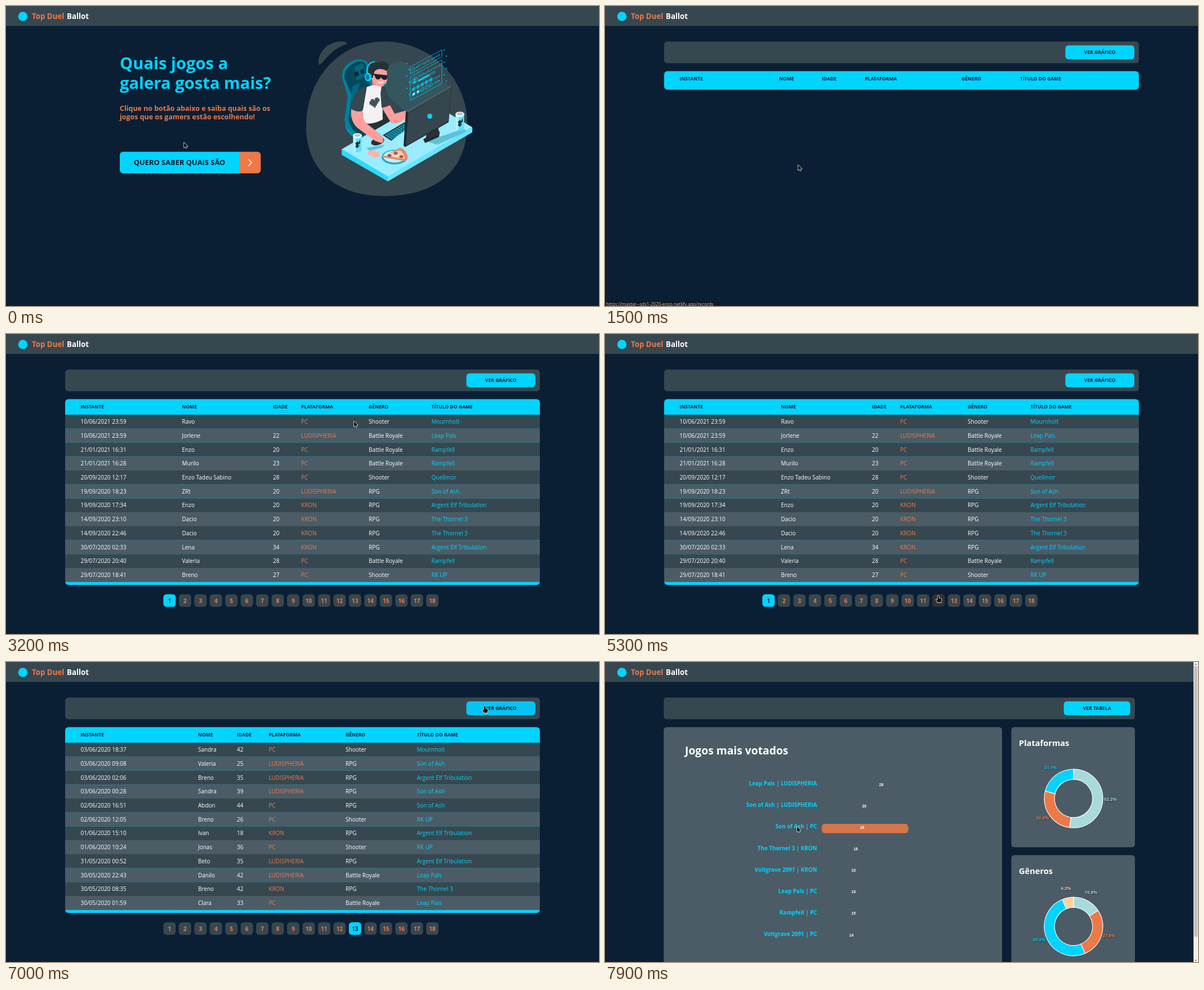
An HTML page with a canvas that plays this animation: 1053x532 px, repeating every 8 s.

```html
<!DOCTYPE html>
<html lang="pt">
<head>
<meta charset="utf-8">
<title>Top Duel Ballot</title>
<style>
html, body { margin: 0; width: 100%; height: 100%; overflow: hidden; background: #0b1f34; }
canvas { display: block; width: 1053px; height: 532px; }
</style>
</head>
<body>
<canvas id="stage"></canvas>
<script>
const W = 1053, H = 532, LOOP = 8000;
const NIGHT = '#0b1f34', SLATE = '#37474f', STEEL = '#4b5c66', CYAN = '#00d4ff', ORANGE = '#ed7947',
      MINT = '#a8dadc', PEACH = '#ffd1a1', SKIN = '#ff9e9b', INK = '#263238';
const SANS = '"Open Sans", "Noto Sans", sans-serif';
const HELV = '"Liberation Sans", Arial, sans-serif';

const canvas = document.getElementById('stage');
const c = canvas.getContext('2d');
const dpr = window.devicePixelRatio || 1;
canvas.width = W * dpr;
canvas.height = H * dpr;

// ---------- drawing helpers ----------
function rect(x, y, w, h, color, r = 0) {
  c.fillStyle = color;
  c.beginPath();
  c.roundRect(x, y, w, h, r);
  c.fill();
}
function text(s, x, y, size, color, { bold = true, align = 'left', font = SANS } = {}) {
  c.font = `${bold ? 700 : 400} ${size}px ${font}`;
  c.textAlign = align;
  c.fillStyle = color;
  c.fillText(s, x, y);
}
function fill(color, d) {
  c.fillStyle = color;
  c.fill(new Path2D(d));
}
function line(color, width, d) {
  c.strokeStyle = color;
  c.lineWidth = width;
  c.stroke(new Path2D(d));
}
function oval(color, x, y, rx, ry = rx, turn = 0) {
  c.fillStyle = color;
  c.beginPath();
  c.ellipse(x, y, rx, ry, turn, 0, 7);
  c.fill();
}
function placed(matrix, draw) {
  c.save();
  c.transform(...matrix);
  draw();
  c.restore();
}

// ---------- data ----------
const GAMES = ['Mournholt', 'Leap Pals', 'Rampfell', 'Quellmor', 'Son of Ash',
  'Argent Elf Tribulation', 'The Thornel 3', 'RK UP', 'Voltgrave 2091'];
const GENRES = { S: 'Shooter', B: 'Battle Royale', R: 'RPG' };
const PLATFORMS = { P: 'PC', L: 'LUDISPHERIA', K: 'KRON' };
const HEADS = ['INSTANTE', 'NOME', 'IDADE', 'PLATAFORMA', 'GÊNERO', 'TÍTULO DO GAME'];

// Each row: date|name|age|platform, genre and game codes
function parse(src) {
  return src.trim().split('\n').map(row => {
    const [date, name, age, code] = row.split('|');
    return [date, name, age, PLATFORMS[code[0]], GENRES[code[1]], GAMES[code[2]]];
  });
}
const PAGE1 = parse(`
10/06/2021 23:59|Ravo||PS0
10/06/2021 23:59|Jorlene|22|LB1
21/01/2021 16:31|Enzo|20|PB2
21/01/2021 16:28|Murilo|23|PB2
20/09/2020 12:17|Enzo Tadeu Sabino|28|PS3
19/09/2020 18:23|ZRt|20|LR4
19/09/2020 17:34|Enzo|20|KR5
14/09/2020 23:10|Dacio|20|KR6
14/09/2020 22:46|Dacio|20|KR6
30/07/2020 02:33|Lena|34|KR5
29/07/2020 20:40|Valeria|28|PB2
29/07/2020 18:41|Breno|27|PS7`);
const PAGE12 = parse(`
06/06/2020 21:14|Clara|31|PB1
06/06/2020 13:40|Danilo|27|KR6
06/06/2020 05:22|Breno|38|LR4
05/06/2020 22:51|Ivan|24|PS7
05/06/2020 17:03|Sandra|40|PR4
05/06/2020 11:36|Jonas|29|KR5
05/06/2020 02:18|Valeria|33|LB1
04/06/2020 20:45|Beto|22|PS0
04/06/2020 15:09|Abdon|36|LR5
04/06/2020 09:27|Clara|19|PB2
04/06/2020 03:52|Breno|41|KR6
03/06/2020 23:16|Danilo|30|PS7`);
const PAGE13 = parse(`
03/06/2020 18:37|Sandra|42|PS0
03/06/2020 09:08|Valeria|25|LR4
03/06/2020 02:06|Breno|35|LR5
03/06/2020 00:28|Sandra|39|LR4
02/06/2020 16:51|Abdon|44|PR4
02/06/2020 12:05|Breno|26|PS7
01/06/2020 15:10|Ivan|18|KR5
01/06/2020 10:24|Jonas|36|PS7
31/05/2020 00:52|Beto|35|LR5
30/05/2020 22:43|Danilo|42|LB1
30/05/2020 08:35|Breno|42|KR6
30/05/2020 01:59|Clara|33|PB1`);
const COLS_EMPTY = [132.5, 309, 385, 461.5, 633, 737];
const COLS_FIRST = [132.5, 312.5, 474, 524, 644, 755.5];
const COLS_LATER = [132.5, 341, 410, 466.5, 603, 729.5];
const VOTES = [['1L', 28], ['4L', 20], ['4P', 19], ['6K', 16], ['8K', 15], ['1P', 15], ['2P', 15], ['8P', 14]];

// ---------- pointer ----------
const PATH = [[0, 316, 242], [100, 316, 242], [300, 366, 262], [400, 368, 272], [600, 343, 282],
  [2200, 343, 282], [2400, 314.5, 245], [2700, 314.5, 245], [3200, 618, 155], [3600, 849, 96],
  [4000, 852, 80], [4500, 852, 80], [5300, 592, 466], [5600, 592, 466], [6000, 619, 467],
  [6300, 619, 467], [7000, 850, 80], [7300, 850, 80], [7900, 341, 292]];

function pointerAt(t) {
  const i = PATH.findIndex(k => k[0] > t);
  if (i < 0) return PATH[PATH.length - 1].slice(1);
  const [t0, x0, y0] = PATH[i - 1], [t1, x1, y1] = PATH[i];
  const k = (t - t0) / (t1 - t0);
  return [x0 + (x1 - x0) * k, y0 + (y1 - y0) * k];
}
const inside = ([px, py], x, y, w, h) => px >= x && px <= x + w && py >= y && py <= y + h;

function drawPointer([x, y], hand) {
  placed([1, 0, 0, 1, x, y], () => {
    c.lineJoin = 'round';
    const d = hand
      ? 'M-1.4,-1 Q0,-3 1.2,-1 L1.2,2.6 L4.6,3.4 Q6,4 5.6,6 L4.6,10 L-1,10 L-4,5.6 Q-4,4 -2.6,4.6 L-1.4,5.6 Z'
      : 'M0,0 L0,9.2 L2.2,7.4 L3.7,10.2 L5.1,9.5 L3.8,6.8 L6.7,6.6 Z';
    line('#fff', 1.3, d);
    fill('#101010', d);
  });
}

// ---------- shared page parts ----------
function header(width) {
  rect(0, 0, width, 35.3, SLATE);
  oval(CYAN, 30, 18.5, 8.3);
  text('Top Duel', 46, 22.7, 13.3, ORANGE);
  text('Ballot', 108, 22.7, 13.3, '#fff');
}
function toolbar(x, w, bx, bw, label, hover) {
  rect(x, 63, w, 38.5, SLATE, 5.5);
  rect(bx, 69.8, bw, 24.8, hover ? '#07c3f1' : CYAN, 5.5);
  text(label, bx + bw / 2, 85.2, 8.6, NIGHT, { align: 'center' });
}
function status(path, faded) {
  if (!faded) rect(0, 523.3, 195.5, 9, '#14181d', [0, 2, 0, 0]);
  text('https://master--sds1-2020-enzo.netlify.app/' + path, 2, 532.3, 8,
    faded ? '#5b6873' : '#b4b8bb', { bold: false, font: '"Noto Sans", sans-serif' });
}

// ---------- home ----------
function can(x, y) {
  rect(x - 7.5, y - 15, 15, 31, '#5ce3ff', 5);
  rect(x - 7.5, y - 14, 5, 29, '#b9f3ff', 4);
  oval('#fff', x, y - 13, 8, 4.5);
  oval('#b5c6cc', x, y - 13.6, 5.5, 2.6);
  fill(INK, `M${x - 4},${y + 1} l4,-4 l2,2 l3,-5 l0,6 l-4,4 l3,0 l-4,5 l-4,-2 l2,-3 z`);
}

function hologram() {
  for (let i = 0; i < 12; i++) {
    const left = i < 6, k = i % 6;
    const x = left ? 712 + k % 2 * 4 : 778 + k % 2 * 4;
    const y = (left ? 102 : 78) + k * 11;
    line(CYAN, .7, `M${x - 1.4},${y} h2.8 M${x},${y - 1.4} v2.8`);
  }
  placed([1, -.54, 0, 1, 718, 108], () => {
    c.strokeStyle = CYAN;
    c.lineWidth = .8;
    c.beginPath();
    c.roundRect(0, 0, 56, 12.5, 2);
    c.roundRect(0, 17.5, 56, 42, 2);
    c.stroke();
    text('START NEW GAME', 28, 8.7, 6, CYAN, { align: 'center', bold: false });
    text('TurboRunner42', 14, 27, 5.8, CYAN, { bold: false });
    c.beginPath();
    c.arc(7.5, 28, 5, 0, 7);
    c.stroke();
    oval(CYAN, 7.5, 26.5, 1.8);
    oval(CYAN, 7.5, 30.7, 3, 1.7);
    c.strokeRect(14, 31, 29, 2.8);
    rect(14, 31, 20, 2.8, CYAN);
    for (let i = 0; i < 10; i++) {
      const x = 6 + i % 5 * 7.6, y = i < 5 ? 42.5 : 51.5;
      c.beginPath();
      c.arc(x, y, 2.7, 0, 7);
      c.stroke();
      if (i < 7) oval(i > 4 ? '#fff' : CYAN, x, y, 1.7);
    }
    text('+5.2m', 42, 45, 3.8, CYAN);
    text('+0.9m', 42, 53, 3.8, CYAN);
  });
}

function illustration() {
  fill(SLATE, 'M672,63 C755,63 819,130 819,208 C819,290 765,337 672,337 C585,337 533,290 533,214 C533,130 590,63 672,63Z');
  fill(SLATE, 'M555,103 C553,80 575,62 596,63 C603,63 608,66 604,68 C580,76 572,90 560,102 C558,104 555,105 555,103Z');
  fill('#33565f', 'M672,108 L700,97 L790,142 L712,190 L676,158Z');

  // chair
  fill('#00819d', 'M613,99 C622,93 638,94 642,101 L654,150 L666,212 L640,235 C622,238 604,222 601,202 L607,160 L597,128 C595,116 602,104 613,99Z');
  fill('#05485b', 'M617,102 C625,96 636,97 639,103 L650,160 L655,215 L634,231 C621,228 610,214 608,200 L614,158 L601,128 C600,116 608,106 617,102Z');
  fill('#006780', 'M619,108 L634,101 L640,124 L622,132Z M615,142 L628,137 L622,166 L618,198 L611,198Z');
  fill('#0c2c3a', 'M618,119 L625,115 L627,123 L621,126Z M629,114 L635,111 L637,119 L631,121Z');
  fill('#0094b3', 'M602,208 C607,224 626,237 650,231 L650,237 C624,242 603,228 602,208Z');

  // torso
  fill(INK, 'M632,203 L668,188 L704,208 L676,230 L640,222Z');
  fill('#e88684', 'M650,132 L666,138 L665,147 L651,149Z');
  fill('#f2f2f2', 'M634,148 C642,140 665,138 670,143 L668,165 L669,201 C655,209 642,210 635,207 L632,175Z');
  fill(SLATE, 'M641,142 C623,146 614,162 613,181 C620,187 628,187 634,184 L638,160Z');
  fill(SLATE, 'M667,141 C676,146 681,164 682,175 C678,181 672,182 667,180 L665,155Z');
  placed([1, -.35, .08, 1, 645, 167], () =>
    ['0110110', '1111111', '1111111', '0111110', '0011100', '0001000'].forEach((row, j) =>
      [...row].forEach((on, i) => +on && rect(i * 2.5, j * 2.7, 2.7, 2.8, SLATE))));

  // head
  fill(SKIN, 'M650,110 C658,105 672,106 676,112 L677,128 C677,138 671,143 665,143 C657,142 651,136 649,129Z');
  fill(INK, 'M644,121 C640,104 649,97 658,101 C665,97 677,98 679,104 C681,109 677,114 675,115 C668,110 657,111 654,117 L651,128 L645,127Z');
  fill('#14222b', 'M651,120 L678,123 L676,130 C671,133 667,129 666,126 C663,133 656,131 655,124Z');
  line('#fff', 1.5, 'M661,135 Q666,138 670,134');
  line(CYAN, 2.2, 'M642,124 C638,107 646,99 655,99');
  oval(CYAN, 643, 126, 6, 7.5);
  oval('#067e9d', 642, 126, 3.4, 4.8);
  oval('#0088a8', 673, 140, 2.2);

  // desk
  fill('#9becff', 'M596,254 L747,167 L828,215 L678,303Z');
  fill('#2ed9ff', 'M596,254 L678,302 L678,311 L596,264Z');
  fill('#69e5ff', 'M678,302 L828,215 L828,224 L678,311Z');
  fill('#5cc3d6', 'M746,240 L812,218 L819,222 L766,246Z M640,252 L672,246 L668,251 L646,257Z');

  // keyboard and arms
  fill(INK, 'M669,229 L708,206 L714,215 L684,239Z');
  placed([.86, -.5, .75, .5, 673, 229], () => {
    for (let i = 0; i < 36; i++) rect(i % 9 * 4.5, (i / 9 | 0) * 4, 3.3, 2.8, '#0cb5d9');
  });
  fill(SKIN, 'M668,181 L682,176 L690,191 L712,185 L709,200 C700,207 690,211 683,206Z');
  oval(INK, 660, 240, 12, 6.5, -.3);
  fill(SKIN, 'M613,183 Q624,189 633,186 C633,196 636,204 640,208 L664,227 C672,234 672,242 666,243 L655,239 L624,216 C614,207 612,195 613,183Z');

  // monitor
  fill('#1d282e', 'M741,236 L770,222 L769,232 L744,243Z');
  fill(INK, 'M748,218 L766,209 L770,228 L745,238Z');
  fill('#1d282e', 'M710,186 L788,141 L791,143 L786,206 L709,250 L706,248Z');
  fill('#36464e', 'M714,190 L790,145 L786,204 L710,248Z');
  fill('#4a5b64', 'M710,186 L788,141 L791,144 L714,189Z');
  oval(CYAN, 752.5, 195.5, 4.5);

  hologram();
  can(624, 243);
  can(806, 205);

  // snack
  oval('#27a6c4', 690, 268, 23, 13);
  oval('#b9f3ff', 690, 267, 20, 10.5);
  fill('#e58970', 'M668,268 L700,251 Q713,256 713,270 L708,275Z');
  fill('#ffd2a8', 'M668,265 L699,256 Q707,260 708,271Z');
  [[681, 265], [692, 261], [702, 267]].forEach(p => oval('#a8505a', ...p, 3.6, 2.6));
  fill('#ffb3a7', 'M642,260 L650,254 L655,258 L663,259 L662,268 L653,269 L649,264 L644,265Z');
}

function home() {
  header(W);
  text('Quais jogos a', 202, 111.5, 29.2, CYAN);
  text('galera gosta mais?', 202, 147, 29.2, CYAN);
  text('Clique no botão abaixo e saiba quais são os', 202, 186, 12.45, ORANGE);
  text('jogos que os gamers estão escolhendo!', 202, 200.7, 12.45, ORANGE);
  rect(202, 258.5, 212, 38.3, CYAN, [6, 0, 0, 6]);
  rect(414, 258.5, 38.4, 38.3, ORANGE, [0, 6, 6, 0]);
  text('QUERO SABER QUAIS SÃO', 308, 282.3, 12.9, NIGHT, { align: 'center' });
  line('#fff', 1.4, 'M430,271.5 L436.3,277.7 L430,284');
  illustration();
}

// ---------- records ----------
function records(t, at) {
  const overButton = inside(at, 818, 70, 122, 25);
  header(W);
  toolbar(105, 843, 817.5, 122.5, 'VER GRÁFICO', overButton);

  const empty = t < 1800;
  const cols = empty ? COLS_EMPTY : t < 5700 ? COLS_FIRST : COLS_LATER;
  rect(105, 115.5, 843, empty ? 33 : 329.5, CYAN, 6);
  HEADS.forEach((h, i) => text(h, cols[i], 132.2, 8.55, NIGHT));
  if (empty) return overButton;

  const rows = t < 5700 ? PAGE1 : t < 6400 ? PAGE12 : PAGE13;
  rows.forEach((row, j) => {
    const y = 143 + j * 24.73;
    rect(105, y, 843, 24.78, j % 2 ? STEEL : SLATE);
    row.forEach((s, i) => text(s, cols[i], y + 16.1, 10,
      i === 3 ? ORANGE : i === 5 ? CYAN : '#fff', { bold: false }));
  });

  const active = t < 5500 ? 1 : t < 6200 ? 12 : 13;
  let overPage = false;
  for (let n = 1; n <= 18; n++) {
    const x = 290.4 + (n - 1) * 27.45, over = inside(at, x - 11, 461, 22, 23);
    overPage = overPage || over;
    rect(x - 11, 461.5, 22, 22.3, n === active ? CYAN : over ? '#2f3237' : SLATE, 5.5);
    text(n, x, 476.6, 10, n === active ? NIGHT : ORANGE, { align: 'center' });
  }
  return overButton || overPage;
}

// ---------- charts ----------
function donut(x, y, parts, sweep) {
  let a = 0;
  c.strokeStyle = '#fff';
  c.lineWidth = 1.1;
  c.lineJoin = 'round';
  for (const [pct, color, lx, ly] of parts) {
    const end = Math.min(a + pct / 100, sweep);
    if (end > a) {
      const from = (a - .25) * 2 * Math.PI, to = (end - .25) * 2 * Math.PI;
      c.beginPath();
      c.arc(x, y, 52, from, to);
      c.arc(x, y, 33.8, to, from, true);
      c.closePath();
      c.fillStyle = color;
      c.fill();
      c.stroke();
    }
    a += pct / 100;
    if (sweep >= 1) {
      c.shadowColor = 'rgba(0,0,0,.55)';
      c.shadowOffsetX = c.shadowOffsetY = dpr;
      c.shadowBlur = dpr;
      text(pct.toFixed(1) + '%', lx, ly + 2.8, 7.7, color, { align: 'center' });
      c.shadowColor = 'transparent';
    }
  }
}

function charts(t, at) {
  header(1045);
  toolbar(104.3, 836.7, 814.7, 118, 'VER TABELA', false);
  rect(104.3, 115.5, 600.7, 440, STEEL, 5.5);
  rect(721.5, 115.5, 219.5, 213, STEEL, 5.5);
  rect(721.5, 342.5, 219.5, 213, STEEL, 5.5);
  text('Jogos mais votados', 142, 164, 19.3, '#fff');
  text('Plataformas', 735, 148.8, 14.6, '#fff');
  text('Gêneros', 735, 375.5, 14.6, '#fff');

  if (t >= 7500) {
    VOTES.forEach(([code, n], i) => {
      const y = 215.5 + i * 38.15;
      if (Math.abs(at[1] - y) < 12 && at[0] < 545) {
        rect(384.5, y - 4.8, n * 8.12, 16.6, '#d5754b', { x: 5, y: 8.3 });
      }
      const name = GAMES[code[0]] + ' | ' + PLATFORMS[code[1]];
      text(name, 376.5, y + 3.6, 9.8, CYAN, { align: 'right' });
      text(n, 384.5 + n * 3.79, y + 4, 6.9, '#fff', { align: 'center', font: HELV });
    });
    const sweep = Math.min(1, (t - 7400) / 400);
    donut(832, 242, [[52.2, MINT, 897.5, 243.5], [26.8, ORANGE, 777, 275.7], [21.1, CYAN, 791.3, 187]], sweep);
    donut(832, 469, [[15.8, MINT, 863, 408], [27.8, ORANGE, 895, 485], [50.2, CYAN, 771, 491.7],
      [6.2, PEACH, 818.7, 401.3]], sweep);
  }

  rect(1045, 0, 8, H, '#f1f1f1');
  rect(1046, 7.5, 6, 479.5, '#c1c1c1');
  fill('#7d7d7d', 'M1047,5 L1051,5 L1049,2.5Z M1047,528 L1051,528 L1049,530.5Z');
}

// ---------- timeline ----------
function draw(now) {
  const t = Math.floor(now % LOOP / 100) * 100;
  const at = pointerAt(t);
  let hand = false;
  c.setTransform(dpr, 0, 0, dpr, 0, 0);
  rect(0, 0, W, H, NIGHT);
  if (t < 1500) {
    home();
    hand = inside(at, 202, 258, 250, 39);
  } else if (t < 7400) {
    hand = records(t, at);
  } else {
    charts(t, at);
  }
  if (t >= 300 && t < 1900) status('records', t >= 1800);
  if ((t >= 3700 && t < 4700) || (t >= 7200 && t < 7400)) status('charts', false);
  drawPointer(at, hand);
}

const start = performance.now();
function tick() {
  draw(performance.now() - start);
  requestAnimationFrame(tick);
}
tick();
</script>
</body>
</html>
```
